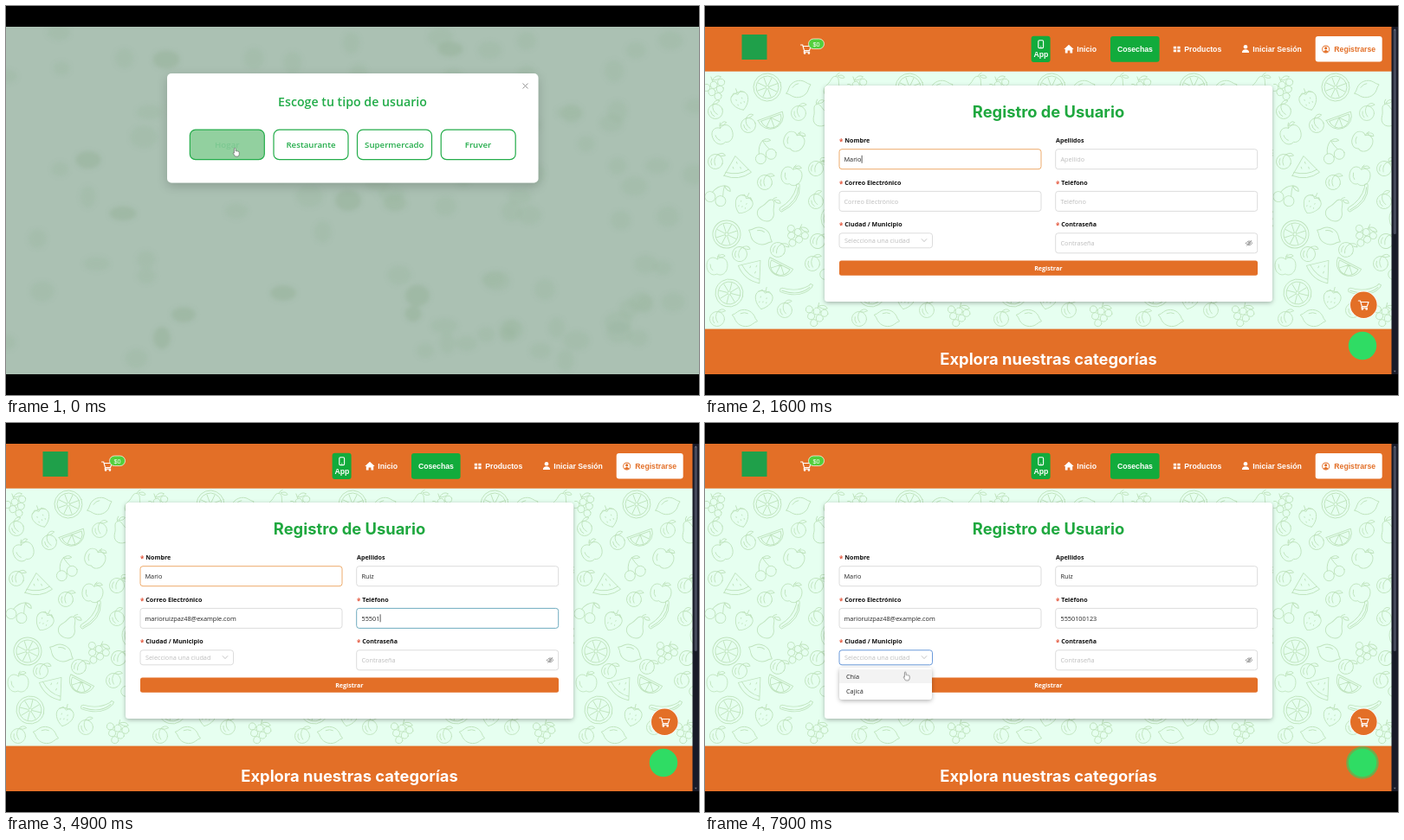
Write an HTML page that moves like this. It is 800 by 450 pixels and loops after 8000 ms.

```html
<!DOCTYPE html>
<html lang="es">
<head>
<meta charset="utf-8">
<title>Registro de Usuario</title>
<style>
  html, body { margin: 0; width: 100%; height: 100%; overflow: hidden; background: #000; }
  svg { display: block; }
  svg.stage { width: 100vw; height: 100vh; }
  text { font-family: "Open Sans", "Noto Sans", sans-serif; font-size: 7.3px; fill: #222; }
  .nav text { font: bold 8.7px "Liberation Sans", Arial, sans-serif; fill: #fff; }
  .head { font: 700 18.35px Inter, sans-serif; text-anchor: middle; }
  .label text { font-weight: 700; font-size: 7.1px; fill: #111; }
  .label .req { fill: #e4573d; font-size: 8px; }
  .hint { fill: #bdbdbd; }
  .box { fill: #fff; stroke: #d9d9d9; stroke-width: .9; }
  .choice { fill: #fff; stroke: #22ac49; stroke-width: 1.2; }
  .choice text { font-size: 9.7px; font-weight: 600; fill: #22ac49; stroke: none; text-anchor: middle; }
  .line { fill: none; stroke-linecap: round; stroke-linejoin: round; }
  .fruit { fill: none; stroke: #bfe3bd; stroke-width: .9; stroke-linecap: round; stroke-linejoin: round; }

  /* One loop is 8 s: 1.25% is 100 ms. */
  .a { animation: 8s linear infinite; }
  .step { animation-timing-function: step-end; }
  .home { animation-name: home; }
  .settle { animation-name: settle; }
  .nav { animation-name: navSettle; }
  .thumb { animation-name: thumb; }
  .logo { animation-name: logo; }
  .tabOff { animation-name: tabOff; }
  .tabOn { animation-name: tabOn; }
  .nav .inkOff { animation-name: inkOff; }
  .nav .inkOn { animation-name: inkOn; }
  .name { animation-name: nameBox; }
  .last { animation-name: lastBox; }
  .mail { animation-name: mailBox; }
  .tel { animation-name: telBox; }
  .city { animation-name: cityBox; }
  .menu { animation-name: menu; transform-origin: 0 283px; }
  .hand { animation-name: hand; }
  @keyframes home { 0% { opacity: 1 } 2.5%, 100% { opacity: 0 } }
  @keyframes settle { 0% { transform: translateY(-21.8px) } 6.25%, 100% { transform: none } }
  @keyframes navSettle { 0% { transform: translateY(-11.3px) } 6.25%, 100% { transform: none } }
  @keyframes thumb { 0% { transform: translateY(6px) } 6.25%, 100% { transform: none } }
  @keyframes logo { 0% { opacity: 0 } 6.25%, 100% { opacity: 1 } }
  @keyframes tabOff { 0%, 6.25% { opacity: 1 } 10.6%, 100% { opacity: 0 } }
  @keyframes tabOn { 0%, 6.25% { opacity: 0 } 10.6%, 100% { opacity: 1 } }
  @keyframes inkOff { 0%, 6.25% { fill: #e36f27 } 10.6%, 100% { fill: #fff } }
  @keyframes inkOn { 0%, 6.25% { fill: #fff } 10.6%, 100% { fill: #e36f27 } }
  @keyframes nameBox { 0%, 7.5% { stroke: #d9d9d9 } 9.5%, 80.5% { stroke: #eba25c } 82.5%, 100% { stroke: #d9d9d9 } }
  @keyframes lastBox { 0%, 22% { stroke: #d9d9d9 } 24%, 31.3% { stroke: #5b8fd6 } 33.7%, 100% { stroke: #d9d9d9 } }
  @keyframes mailBox { 0%, 31.3% { stroke: #d9d9d9 } 33.7%, 46.3% { stroke: #5b8fd6 } 48.5%, 100% { stroke: #d9d9d9 } }
  @keyframes telBox { 0%, 47% { stroke: #d9d9d9 } 48.7%, 71.5% { stroke: #5fa3b8 } 73.5%, 100% { stroke: #d9d9d9 } }
  @keyframes cityBox { 0%, 72% { stroke: #d9d9d9 } 73.7%, 100% { stroke: #5b8fd6 } }
  @keyframes menu { 0%, 87.5% { opacity: 0; transform: scaleY(.8) } 90%, 100% { opacity: 1; transform: none } }
  @keyframes hand {
    0%, 2.49% { transform: translate(262px, 164px); opacity: 1 }
    2.5%, 82.4% { transform: translate(300px, 180px); opacity: 0 }
    82.5% { transform: translate(300px, 180px); opacity: 1; animation-timing-function: ease-in-out }
    86.25%, 88.5% { transform: translate(240px, 270px); animation-timing-function: ease-in-out }
    93.75% { transform: translate(228.5px, 287.5px) }
    97.5%, 100% { transform: translate(229px, 287.7px); opacity: 1 }
  }
</style>
</head>
<body>
<svg class="stage" viewBox="0 0 800 450">
  <defs>
    <filter id="soft" x="-20%" y="-20%" width="140%" height="150%"><feDropShadow dx="0" dy="1.5" stdDeviation="2.5" flood-opacity=".3"/></filter>
    <filter id="lift" x="-20%" y="-30%" width="140%" height="170%"><feDropShadow dx="0" dy="4" stdDeviation="6" flood-opacity=".18"/></filter>
    <filter id="blur"><feGaussianBlur stdDeviation="2.5"/></filter>

    <g id="apple"><path d="M0-7C-4-11-12-9-12 0S-5 13 0 10C5 13 12 9 12 0S4-11 0-7Q0-11 2-13M1-10Q6-15 9-11Q5-8 1-10M-8-1Q-8 4-5 6"/></g>
    <g id="wheel"><circle r="16"/><circle r="13"/><circle r="2"/><path d="M0-3V-12M0 3V12M-3 0H-12M3 0H12M-2-2L-8.5-8.5M2 2L8.5 8.5M-2 2L-8.5 8.5M2-2L8.5-8.5"/></g>
    <g id="wedge"><path d="M-15-5H15A15 15 0 0 1-15-5ZM-12-3H12A12 12 0 0 1-12-3ZM0-3V8M0-3L-8 5M0-3L8 5"/></g>
    <g id="melon"><path d="M-16 3L4-14L15 10Q-2 15-16 3ZM-13 0Q0 9 13 6M-3-3v2M3-7v2M5 0v2"/></g>
    <g id="banana"><path d="M16-11Q11 7-14 10Q-17 7-14 5Q3 2 12-11L13-14H16ZM14-10Q8 5-13 8"/></g>
    <g id="pear"><path d="M0-13C-5-13-4-6-7-2C-13 6-8 13 0 13S13 6 7-2C4-6 5-13 0-13Q0-16 3-18M2-14Q7-18 10-14Q6-11 2-14"/></g>
    <g id="cherry"><circle cx="-6" cy="6" r="6"/><circle cx="7" cy="5" r="6"/><path d="M-6 0Q-4-9 3-13Q4-7 7-1M3-13Q10-15 12-10Q7-9 3-13"/></g>
    <g id="berry"><path d="M0 13C-8 9-13-1-8-6C-4-9 4-9 8-6C13-1 8 9 0 13M-8-6L-4-9L0-6L4-9L8-6M0-8V-13M-4-1v1M3-1v1M0 4v1M-4 5v1M4 4v1"/></g>
    <g id="lemon"><path d="M-15 0Q-12-2-10-5C-5-11 5-11 10-5Q12-2 15 0Q12 2 10 5C5 11-5 11-10 5Q-12 2-15 0M-6-4Q-2-7 2-6"/></g>
    <g id="grapes"><circle cx="-9" cy="-5" r="4"/><circle cy="-5" r="4"/><circle cx="9" cy="-5" r="4"/><circle cx="-5" cy="2" r="4"/><circle cx="5" cy="2" r="4"/><circle cy="9" r="4"/><path d="M0-9V-15M0-11Q7-16 11-11Q6-8 0-11"/></g>
    <g id="plum"><circle r="8.5"/><path d="M0-8.5Q-4-2 1 4M-5-2Q-6 2-3 5M0-8.5Q5-14 9-10Q5-7 0-8.5"/></g>
    <pattern id="fruits" class="fruit" x="0" y="76" width="164" height="298" patternUnits="userSpaceOnUse"></pattern>

    <g id="cart" class="line"><path d="M-6-4.5h2.2l1.8 6.5h6l1.7-5h-9M-1.6 2l-.8 1.6h6.6"/><circle cx="-1.4" cy="5" r=".8"/><circle cx="3.4" cy="5" r=".8"/></g>
    <rect id="choice" width="86" height="34.5" rx="6.5"/>
    <rect id="field" width="233" height="23" rx="3"/>
  </defs>

  <g id="page">
    <g class="a step settle">
      <rect y="50" width="793" height="330" fill="#e6fff0"/>
      <rect y="50" width="793" height="330" fill="url(#fruits)"/>
      <rect y="373.6" width="793" height="90" fill="#e36f27"/>
      <text class="head" x="396.5" y="415" style="fill:#fff">Explora nuestras categorías</text>

      <rect x="138" y="92" width="517" height="250" rx="4" fill="#fff" filter="url(#soft)"/>
      <text class="head" x="396.5" y="128.6" style="fill:#1fa83f">Registro de Usuario</text>

      <g class="label">
        <text class="req" x="155" y="160">*</text><text x="161.3" y="158.3">Nombre</text>
        <text x="405" y="158.3">Apellidos</text>
        <text class="req" x="155" y="208.5">*</text><text x="161.3" y="206.8">Correo Electrónico</text>
        <text class="req" x="405" y="208.5">*</text><text x="411.3" y="206.8">Teléfono</text>
        <text class="req" x="155" y="257">*</text><text x="161.3" y="255.4">Ciudad / Municipio</text>
        <text class="req" x="405" y="257">*</text><text x="411.3" y="255.4">Contraseña</text>
      </g>

      <use href="#field" x="155" y="165.7" class="box a name"/>
      <use href="#field" x="404.7" y="165.7" class="box a last"/>
      <use href="#field" x="155" y="214.4" class="box a mail"/>
      <use href="#field" x="404.7" y="214.4" class="box a tel"/>
      <use href="#field" x="404.7" y="262.8" class="box"/>
      <rect x="155" y="262.8" width="107.5" height="17" rx="3" class="box a city"/>
      <text class="hint" x="161" y="274.1">Selecciona una ciudad</text>
      <path class="line" d="M250.2 269.6l2.8 3 2.8-3" stroke="#b5b5b5" stroke-width=".8"/>
      <text class="hint" x="410.5" y="277">Contraseña</text>
      <g class="line" stroke="#8a8a8a" stroke-width=".8"><path d="M624.3 274.3q3.8-5 7.6 0q-3.8 5-7.6 0M625.5 277.3l5.4-6"/><circle cx="628.1" cy="274.3" r="1.2"/></g>
      <g id="typed"></g>
      <rect id="caret" width=".8" height="9" fill="#333"/>

      <rect x="155" y="294.6" width="483" height="17.2" rx="2.5" fill="#e36f27"/>
      <text x="396.3" y="306" text-anchor="middle" style="fill:#fff;font-weight:700;font-size:7.1px">Registrar</text>
    </g>

    <rect y="24" width="793" height="51.7" fill="#e36f27" class="a step settle"/>
    <rect class="a step logo" x="42.5" y="33" width="29" height="29" fill="#1fa04a"/>

    <g class="nav a step">
      <use href="#cart" x="116.5" y="49.5" stroke="#fff" stroke-width="1.1"/>
      <rect x="119.5" y="38" width="18" height="11.6" rx="5.8" fill="#52cf3c" stroke="#fff" stroke-width=".7"/>
      <text x="128.5" y="46.6" text-anchor="middle" style="font-size:7.2px;font-weight:400">$0</text>

      <rect x="376.6" y="34.7" width="22" height="30.3" rx="3" fill="#12ab3c"/>
      <rect x="384.8" y="39.8" width="5.8" height="8.8" rx="1.2" fill="none" stroke="#fff" stroke-width="1.1"/>
      <path d="M387 47h1.4" stroke="#fff" stroke-width=".8"/>
      <text x="387.9" y="58.5" text-anchor="middle">App</text>

      <rect x="407" y="35.2" width="53" height="29.5" rx="3" fill="#fff" class="a tabOff"/>
      <g class="a inkOff" fill="#fff"><path d="M414.3 50l5.7-5.3 5.7 5.3h-1.5v4.4h-2.8v-3h-2.8v3h-2.8v-4.4z"/></g>
      <text class="a inkOff" x="429.3" y="53">Inicio</text>

      <rect x="468" y="35" width="56.6" height="29.8" rx="3" fill="#12ab3c"/>
      <text x="496.4" y="53" text-anchor="middle">Cosechas</text>

      <path d="M540.8 46.7h3.3v2.7h-3.3zM545.3 46.7h3.3v2.7h-3.3zM540.8 50.6h3.3v2.7h-3.3zM545.3 50.6h3.3v2.7h-3.3z" fill="#fff"/>
      <text x="553.3" y="53">Productos</text>

      <g fill="#fff"><circle cx="624" cy="47.3" r="2.3"/><path d="M619.9 54q0-3.8 4.1-3.8t4.1 3.8z"/></g>
      <text x="632.3" y="53">Iniciar Sesión</text>

      <rect x="704.7" y="35" width="77" height="29.6" rx="3" fill="#fff" class="a tabOn"/>
      <g class="a inkOn"><path fill-rule="evenodd" d="M712.2 50a4.5 4.5 0 1 1 9 0a4.5 4.5 0 1 1-9 0zM713.1 50a3.6 3.6 0 1 0 7.2 0a3.6 3.6 0 1 0-7.2 0z"/><circle cx="716.7" cy="48.8" r="1.6"/><path d="M713.9 52.7q2.8-3.3 5.6 0l-2.8 1.2z"/></g>
      <text class="a inkOn" x="726.3" y="53">Registrarse</text>
    </g>

    <circle cx="760.3" cy="345.8" r="16" fill="#fff"/>
    <circle cx="760.3" cy="345.8" r="15.3" fill="#e36f27"/>
    <use href="#cart" x="760.3" y="345.5" stroke="#fff" stroke-width="1.1"/>
    <circle id="ring" cx="759" cy="393" r="16" fill="#25d366"/>
    <circle cx="759" cy="393" r="16.2" fill="#2fdc64"/>

    <g class="a menu">
      <rect x="155" y="283" width="107" height="37" rx="4" fill="#fff" filter="url(#soft)"/>
      <rect x="155" y="285" width="107" height="16" fill="#f3f3f3"/>
      <text x="163" y="295.7">Chía</text>
      <text x="163" y="313">Cajicá</text>
    </g>

    <rect x="792.5" y="24" width="7.5" height="402" fill="#191b28"/>
    <rect class="a step thumb" x="794.7" y="27" width="3.2" height="237" rx="1.6" fill="#474b5c"/>
    <path d="M794.8 28.2l1.5-2 1.5 2zM794.8 421.8l1.5 2 1.5-2z" fill="#6b6f7e"/>
  </g>

  <g class="a step home">
    <rect y="20" width="800" height="410" fill="#abc1b3"/>
    <g id="blobs" fill="#93b297" filter="url(#blur)"></g>
    <rect x="186" y="78" width="428.5" height="126.5" rx="5" fill="#fff" filter="url(#lift)"/>
    <path class="line" d="M596.8 89.8l5.4 5.4M602.2 89.8l-5.4 5.4" stroke="#8c8c8c" stroke-width=".9"/>
    <text x="400" y="116" text-anchor="middle" style="font-size:14.2px;font-weight:600;fill:#22ac49">Escoge tu tipo de usuario</text>
    <g class="choice">
      <use href="#choice" x="212.3" y="143.2" fill="#92d09f"/><text x="255.3" y="164" style="fill:#7cc891">Hogar</text>
      <use href="#choice" x="309" y="143.2"/><text x="352" y="164">Restaurante</text>
      <use href="#choice" x="405.5" y="143.2"/><text x="448.3" y="164">Supermercado</text>
      <use href="#choice" x="502.2" y="143.2"/><text x="545" y="164">Fruver</text>
    </g>
  </g>

  <g class="a hand">
    <path d="M1.4.7q1-.9 1.7.1v3q1-.6 1.5.2 1-.4 1.4.4 1.2-.2 1.2.9v2.2q-.2 1.6-1.2 2.5h-3.4q-1.4-1.8-2.5-3.9.5-1.2 1.3 0z" fill="#fff" stroke="#555" stroke-width=".6"/>
  </g>
  <path d="M0 0H800V24H0ZM0 426H800V450H0Z"/>
</svg>

<script>
  const LOOP = 8000;
  const $ = id => document.getElementById(id);
  const add = (parent, tag, attrs) => {
    const el = document.createElementNS('http://www.w3.org/2000/svg', tag);
    for (const k in attrs) el.setAttribute(k, attrs[k]);
    return parent.appendChild(el);
  };

  // Fruit tile: kind, then x, y pairs.
  const tile = {
    grapes: '12,20 105,190 128,282', berry: '40,32 45,152 68,262', lemon: '108,20 64,190 46,285',
    apple: '20,72 103,80 100,120 14,224', wedge: '77,56 86,226', pear: '133,50 72,160 148,18',
    melon: '36,112 54,229', banana: '98,148 104,252 150,98', cherry: '68,93 14,142 146,230',
    wheel: '72,18 25,188 28,256 150,170',
    plum: '12,46 128,112 69,128 108,48 128,150 84,206 40,211 124,222 92,276 50,62 130,196 12,104 14,286'
  };
  for (const kind in tile) tile[kind].split(' ').forEach((at, i) =>
    add($('fruits'), 'use', { href: '#' + kind, transform: `translate(${at}) rotate(${i * 47 % 60 - 20})` }));

  // Faint blotches spread by a seeded generator.
  let seed = 7;
  const rand = (from, to) => {
    seed = seed * 16807 % 2147483647;
    return from + (to - from) * seed / 2147483647;
  };
  const blob = (cx, cy, opacity) => add($('blobs'), 'ellipse', { cx, cy, rx: rand(9, 16), ry: rand(8, 13), opacity });
  for (let i = 0; i < 90; i++) blob(rand(0, 800), rand(30, 420), .22);
  const strong = '513,50 185,62 95,178 395,225 475,335 320,332 205,357 180,384 135,240 470,356';
  for (const at of strong.split(' ')) blob(...at.split(','), .5);

  // After `keys` typed characters the rest is filled in at once.
  const fields = [
    { hint: 'Nombre', text: 'Mario', x: 160.5, y: 180.2, focus: 900, from: 1000, gap: 140, blur: 1800 },
    { hint: 'Apellido', text: 'Ruiz', x: 410.5, y: 180.2, focus: 1800, from: 1900, gap: 120, blur: 2450 },
    { hint: 'Correo Electrónico', text: 'marioruizpaz48@example.com', x: 160.5, y: 228.7, focus: 2450, from: 3100, gap: 200, keys: 2, blur: 3750 },
    { hint: 'Teléfono', text: '5550100123', x: 410.5, y: 228.7, focus: 4000, from: 4150, gap: 170, blur: 5800 }
  ];
  for (const f of fields) f.el = add($('typed'), 'text', { x: f.x, y: f.y });

  function draw(t) {
    const caret = $('caret');
    caret.style.opacity = 0;
    for (const f of fields) {
      let n = Math.max(0, Math.floor((t - f.from) / f.gap) + 1);
      if (f.keys && n > f.keys) n = f.text.length;
      const shown = n ? f.text.slice(0, n) : f.hint;
      if (f.el.textContent !== shown) f.el.textContent = shown;
      f.el.classList.toggle('hint', !n);
      if (t >= f.focus && t < f.blur) {
        const still = n ? (t - f.from) % f.gap : t - f.focus;
        caret.setAttribute('x', f.x + (n ? f.el.getComputedTextLength() + .3 : -.2));
        caret.setAttribute('y', f.y - 7.4);
        caret.style.opacity = still % 1300 < 650 ? 1 : 0;
      }
    }
    const p = ((t + 1325) % 1775) / 650;
    $('ring').setAttribute('r', 16 + 5 * Math.min(p, 1));
    $('ring').setAttribute('opacity', p < 1 ? .6 * Math.sin(Math.PI * p) : 0);
  }

  let start;
  function tick(now) {
    start ??= now;
    draw((now - start) % LOOP);
    requestAnimationFrame(tick);
  }
  draw(0);
  requestAnimationFrame(tick);
</script>
</body>
</html>
```
